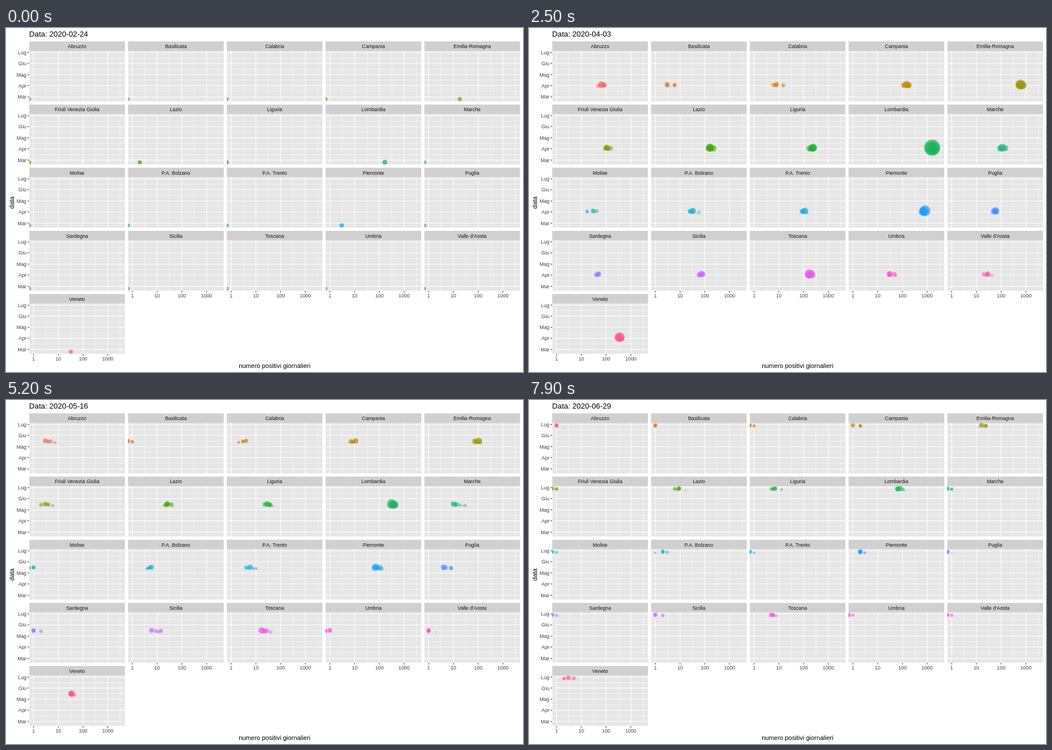
An HTML page with a canvas for the animation above (8 s loop, 900x600 px).

```html
<!DOCTYPE html>
<html lang="it">
<head>
<meta charset="utf-8">
<style>
html, body { margin: 0; width: 100%; height: 100%; overflow: hidden; background: #fff }
canvas { display: block }
</style>
</head>
<body>
<canvas id="stage" width="900" height="600"></canvas>
<script>
const ctx = document.getElementById("stage").getContext("2d");
const FRAMES = 80, STEP = 100, DAYS = 126, WAKE = 5;
const LEFT = 40.5, TOP = 40, W = 166.5, H = 88, COL = 171.95, ROW = 110.15, DECADE = 43.07;
const months = { Mar: 6, Apr: 37, Mag: 67, Giu: 98, Lug: 128 };
const keyDays = [0, 25, 40, 70, DAYS];
const bedDays = [0, 25, 40, 70, DAYS];
const bedShape = [.014, .6, 1, .385, .03].map(Math.log);
const regions = [];

const xOf = v => v > 0 ? 7.5 + DECADE * Math.log10(v) : 0;
const yOf = d => 84 - .635 * d;
const frameOf = d => Math.round(d * (FRAMES - 1) / DAYS);

function lerp(xs, ys, x) {
  let i = 1;
  while (i < xs.length - 1 && x > xs[i]) i++;
  return ys[i - 1] + (ys[i] - ys[i - 1]) * (x - xs[i - 1]) / (xs[i] - xs[i - 1]);
}

function random(seed) {
  return () => (seed = seed * 16807 % 2147483647) / 2147483647;
}

// Evenly spaced hues in polar LUV (chroma 100, luminance 65), slightly darkened
function hueColor(i) {
  const h = (15 + 360 * i / 21) * Math.PI / 180, L = 65;
  const u = 100 * Math.cos(h) / (13 * L) + .1978, v = 100 * Math.sin(h) / (13 * L) + .4683;
  const Y = ((L + 16) / 116) ** 3, X = 9 * Y * u / (4 * v), Z = -X / 3 - 5 * Y + 3 * Y / v;
  const [r, g, b] = [
    3.2405 * X - 1.5371 * Y - .4985 * Z,
    -.9693 * X + 1.876 * Y + .0416 * Z,
    .0556 * X - .204 * Y + 1.0572 * Z
  ].map(c => {
    c = Math.min(1, Math.max(0, c));
    c = c > .00304 ? 1.055 * c ** (1 / 2.4) - .055 : 12.92 * c;
    return Math.round(255 * c ** 1.22);
  });
  return `rgb(${Math.max(25, r)},${g},${b})`;
}

// Daily counts: a log-linear trend through the key days plus seeded scatter, wider for small counts
function region(name, beds, levels, start = 0) {
  const i = regions.length, rnd = random(911 + 7919 * i);
  const trend = [start, ...levels].map(v => Math.log10(Math.max(v, .4)));
  const counts = Array.from({ length: DAYS + 1 }, (_, d) => {
    const level = lerp(keyDays, trend, d);
    const scatter = (rnd() - .5) * (.6 - .15 * level);
    return Math.round(10 ** (keyDays.includes(d) ? level : level + scatter));
  });
  regions.push({ name, beds, counts, color: hueColor(i), x: LEFT + i % 5 * COL, y: TOP + Math.floor(i / 5) * ROW });
}

region("Abruzzo", 73, [64, 65, 8, 1]);
region("Basilicata", 18, [14, 3, 0, 1]);
region("Calabria", 18, [36, 8, 4, 0]);
region("Campania", 125, [97, 151, 14, 1]);
region("Emilia-Romagna", 370, [754, 604, 157, 16], 18);
region("Friuli Venezia Giulia", 60, [130, 107, 6, 0]);
region("Lazio", 185, [190, 160, 38, 9], 2);
region("Liguria", 175, [190, 237, 53, 7]);
region("Lombardia", 1381, [2500, 1598, 577, 78], 166);
region("Marche", 155, [200, 110, 43, 0]);
region("Molise", 8, [8, 30, 0, 0]);
region("P.A. Bolzano", 60, [90, 33, 5, 2]);
region("P.A. Trento", 80, [120, 112, 11, 0]);
region("Piemonte", 450, [500, 815, 191, 2], 3);
region("Puglia", 130, [100, 59, 9, 0]);
region("Sardegna", 28, [60, 48, 2, 0]);
region("Sicilia", 73, [70, 73, 15, 1]);
region("Toscana", 290, [270, 173, 38, 5]);
region("Umbria", 46, [66, 31, 0, 0]);
region("Valle d'Aosta", 25, [49, 29, 1, 0]);
region("Veneto", 330, [547, 358, 55, 3], 32);

function text(s, x, y, size, color, align) {
  ctx.font = size + 'px "Liberation Sans", Arial, sans-serif';
  ctx.fillStyle = color;
  ctx.textAlign = align;
  ctx.fillText(s, x, y);
}

function line(x1, y1, x2, y2, color, width) {
  ctx.strokeStyle = color;
  ctx.lineWidth = width;
  ctx.beginPath();
  ctx.moveTo(x1, y1);
  ctx.lineTo(x2, y2);
  ctx.stroke();
}

function drawGrid() {
  const across = (y, w) => line(0, y, W, y, "#fff", w);
  const down = (x, w) => line(x, 0, x, H, "#fff", w);
  const ys = Object.values(months).map(yOf);
  for (let i = 1; i < ys.length; i++) across((ys[i] + ys[i - 1]) / 2, .53);
  for (let e = 0; e < 4; e++) down(xOf(10 ** (e + .5)), .53);
  ys.forEach(y => across(y, 1.07));
  for (let e = 0; e < 4; e++) down(xOf(10 ** e), 1.07);
}

function drawDots({ counts, beds, color }, frame) {
  ctx.fillStyle = color;
  counts.forEach((v, d) => {
    const age = frame - frameOf(d);
    if (age < 0 || age >= WAKE) return;
    const fade = 1 - age / WAKE;
    const r = 3 + .297 * Math.sqrt(beds * Math.exp(lerp(bedDays, bedShape, d)));
    ctx.globalAlpha = .7 * fade;
    ctx.beginPath();
    ctx.arc(xOf(v), yOf(d), r * fade, 0, 7);
    ctx.fill();
  });
  ctx.globalAlpha = 1;
}

function drawPanel(reg, i, frame) {
  ctx.save();
  ctx.translate(reg.x, reg.y);
  ctx.fillStyle = "#d0d0d0";
  ctx.fillRect(0, -16.6, W, 16.6);
  text(reg.name, W / 2, -4.7, 8.8, "#141414", "center");
  if (i % 5 === 0)
    for (const m in months) {
      const y = yOf(months[m]);
      line(-2.8, y, 0, y, "#282828", 1.07);
      text(m, -5, y + 3.2, 8.8, "#404040", "right");
    }
  if (i > 15)
    for (let e = 0; e < 4; e++) {
      const x = xOf(10 ** e);
      line(x, H, x, H + 2.8, "#282828", 1.07);
      text(10 ** e, x, H + 11.7, 8.8, "#404040", "center");
    }
  ctx.beginPath();
  ctx.rect(0, 0, W, H);
  ctx.clip();
  ctx.fillStyle = "#e6e6e6";
  ctx.fillRect(0, 0, W, H);
  drawGrid();
  drawDots(reg, frame);
  ctx.restore();
}

function draw(frame) {
  ctx.fillStyle = "#fff";
  ctx.fillRect(0, 0, 900, 600);
  const day = Math.floor(frame * DAYS / (FRAMES - 1));
  const date = new Date(Date.UTC(2020, 1, 24 + day)).toISOString().slice(0, 10);
  text("Data: " + date, 40.3, 15, 13.2, "#000", "left");
  text("numero positivi giornalieri", 467.5, 593, 11, "#000", "center");
  ctx.save();
  ctx.translate(13.5, 304.5);
  ctx.rotate(-Math.PI / 2);
  text("data", 0, 0, 11, "#000", "center");
  ctx.restore();
  regions.forEach((reg, i) => drawPanel(reg, i, frame));
}

let shown = -1;
function tick() {
  const frame = Math.floor(performance.now() / STEP) % FRAMES;
  if (frame !== shown) draw(shown = frame);
  requestAnimationFrame(tick);
}
tick();
</script>
</body>
</html>
```
